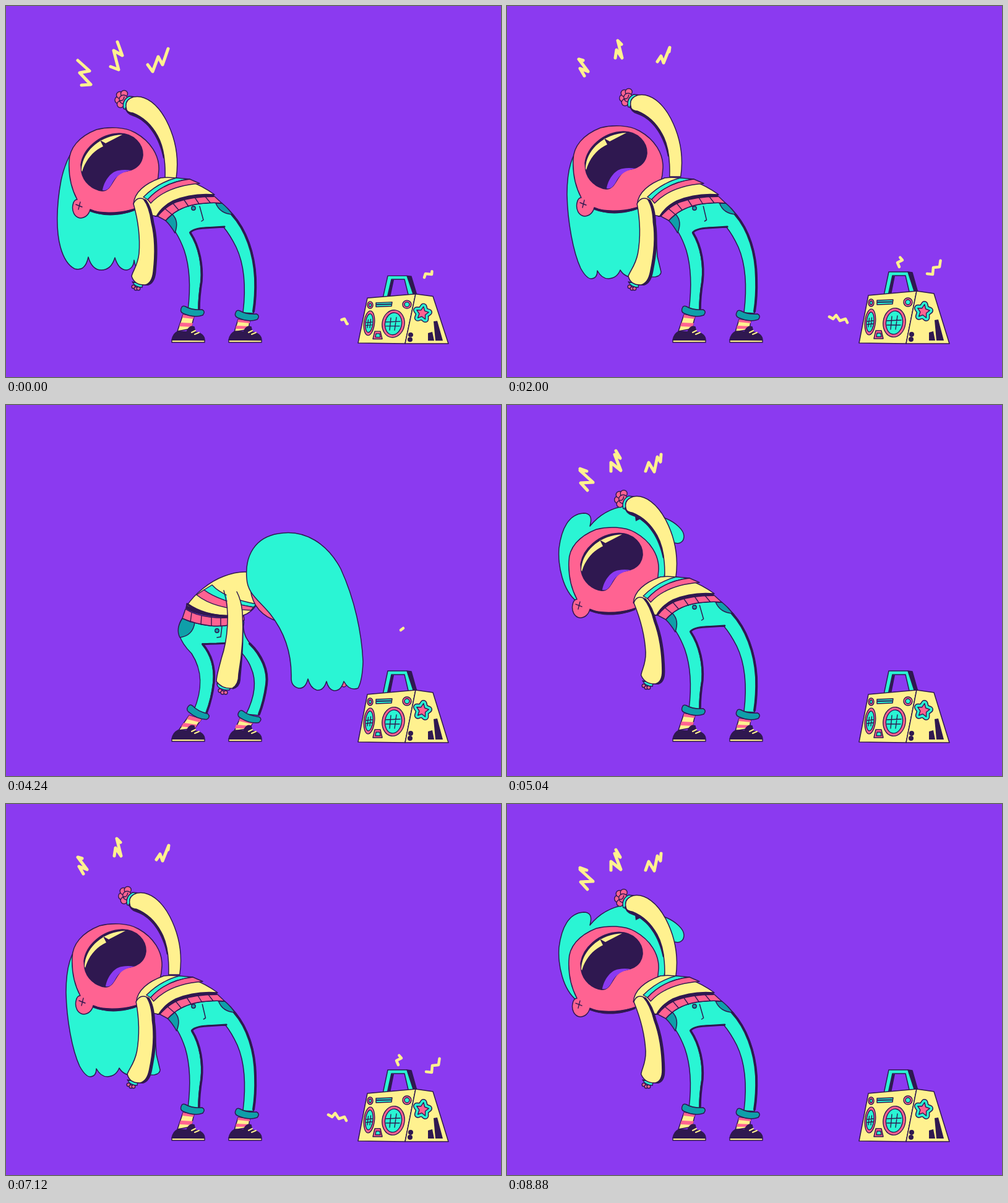
These frames come from a looping animation (800x600 px, 8.96 s). An HTML page:

```html
<!DOCTYPE html>
<html lang="en">
<head>
<meta charset="utf-8">
<title>Headbanger</title>
<style>
html, body { margin: 0; width: 100%; height: 100%; overflow: hidden; background: #8b3af0; }
svg { display: block; width: 100%; height: 100%; }
</style>
</head>
<body>
<svg id="stage" viewBox="0 0 800 600" stroke-linejoin="round" stroke-linecap="round"></svg>
<script>
const BG = '#8b3af0', INK = '#2f1850', TEAL = '#2af5d4', DEEP = '#0f9fa9', PINK = '#ff6392', CREAM = '#fff18f';
const STEP = 80, STEPS = 8;
const stage = document.getElementById('stage');

const shape = (d, fill, w = 1.5) => `<path d="${d}" fill="${fill}" stroke="${INK}" stroke-width="${w}"/>`;
const flat = (d, fill) => `<path d="${d}" fill="${fill}"/>`;
const line = (d, w = 1.5, color = INK) => `<path d="${d}" fill="none" stroke="${color}" stroke-width="${w}"/>`;
const oval = (x, y, rx, fill, ry = rx) =>
  `<ellipse cx="${x}" cy="${y}" rx="${rx}" ry="${ry}" fill="${fill}" stroke="${INK}" stroke-width="1.4"/>`;
const group = (t, s) => `<g transform="${t}">${s}</g>`;
const clamp = v => Math.max(0, Math.min(1, v));
const lerp = (a, b, u) => a + (b - a) * u;

// Move every coordinate pair of an absolute path
const warp = (d, f) => d.replace(/(-?[\d.]+) (-?[\d.]+)/g, (m, x, y) => f(+x, +y).map(v => v.toFixed(1)).join(' '));
const mix = (a, b, u) => {
  const n = b.match(/-?[\d.]+/g);
  let i = 0;
  return a.replace(/-?[\d.]+/g, v => lerp(+v, +n[i++], u).toFixed(1));
};
const leaner = s => d => warp(d, (x, y) => [x + s * clamp((440 - y) / 135), y]);

// Each entry: leaning back, leaning forward
const LEGS = {
  pants: ['M258 347Q275 327 305 321Q330 317 349 319C378 343 395 378 401 415C406 445 403 470 400 497L383 496C388 455 386 420 372 390Q362 370 352 358Q308 356 297 366C312 390 317 420 315 445Q311 470 311 492L294 492C298 460 298 425 288 395Q276 362 258 347Z',
    'M285 345Q305 354 330 357Q360 360 384 348C381 378 395 383 408 405C428 435 424 460 409 502L388 500C403 470 405 445 396 425Q390 408 366 385Q340 386 317 386C332 405 337 425 335 448Q332 475 323 500L303 495C318 460 318 430 300 402Q268 370 285 345Z'],
  outer: ['M365 337C388 362 401 400 403 440Q404 470 400 494', 'M394 386C414 405 424 430 421 452Q417 480 409 500'],
  inner: ['M298 367C313 390 318 420 316 445Q312 470 312 490', 'M318 387C333 405 338 425 336 448Q333 475 324 498'],
  crotch: ['M298 366Q303 360 322 359L353 357', 'M318 387Q330 386 340 386L360 385'],
  pocketL: ['M258 347Q264 341 269 337Q280 348 273 367Q266 355 258 347Z', 'M285 345Q295 350 305 352Q302 373 281 376Q274 362 285 345Z'],
  pocketR: ['M339 319Q346 336 366 337Q358 326 349 319Z', 'M379 352Q380 356 384 356Q385 352 384 348Z'],
  fly: ['M313 324L319 346L316 348', 'M349 358L347 375L341 376'],
  band: ['M245 340Q265 315 300 308Q320 306 337 308L349 319Q330 317 305 321Q275 327 258 347Z',
    'M290 330Q305 340 330 343Q360 347 384 339L385 348Q360 360 330 357Q305 354 285 345Z'],
  ticks: ['M256 327L268 337M268 317L279 330M286 311L295 324M304 308L312 320M321 307L330 318',
    'M300 336L298 351M316 341L315 355M332 343L332 357M347 344L347 358M366 344L367 356'],
  sockL: ['M286 499L304 502L299 522L277 526Z', 'M296 502L316 508L305 523L279 526Z'],
  sockR: ['M375 507L394 509L392 523L369 527Z', 'M378 507L400 512L394 523L369 527Z'],
  stripeL: ['M286 499L304 502L303 506L285 504ZM282 512L302 513L300 519L280 518Z', 'M296 502L316 508L313 513L292 508ZM287 514L309 517L306 522L283 520Z'],
  stripeR: ['M375 507L394 509L394 513L374 511ZM372 517L393 518L393 522L371 522Z', 'M378 507L400 512L398 516L376 511ZM372 517L395 519L393 523L370 523Z']
};

const SHOE = shape('M268 540Q270 530 278 526L292 527Q296 516 304 519L306 527Q321 530 321 541Z', INK) +
  shape('M268 540L321 540.500L321 544L268 544Z', CREAM, 1.4) + line('M300 528L306 525M305 531L312 528', 2, CREAM);
const CUFF = shape('M284 487Q280 494 286 497Q304 505 318 500Q323 494 317 491Q300 492 290 486Q286 484 284 487Z', DEEP);

function legs(u, lean) {
  const part = k => lean(mix(...LEGS[k], u));
  return shape(part('sockL'), CREAM) + flat(part('stripeL'), PINK) + shape(part('sockR'), CREAM) + flat(part('stripeR'), PINK) +
    SHOE + group('translate(92 0)', SHOE) +
    shape(part('pants'), TEAL) + line(part('outer'), 4) + line(part('inner'), 3.6) + line(part('crotch'), 3) +
    shape(part('pocketL'), DEEP) + shape(part('pocketR'), DEEP) + line(part('fly')) +
    oval(lerp(303, 341, u), lerp(327, 365, u), 3.2, DEEP) +
    group(`translate(${9 * u} ${4 * u}) rotate(${17 * u} 302 494)`, CUFF) +
    group(`translate(${88 + 4 * u} ${7 + 4 * u}) rotate(${9 * u} 302 494)`, CUFF) +
    shape(part('band'), PINK) + line(part('ticks'), 1.4);
}

const HEAD = flat('M136 331C152 340 185 340 209 324L209 330C185 341 152 341 136 331Z', INK) +
  shape('M146 200C165 195 192 195 209 205C234 219 248 242 247 265C246 298 228 322 205 329C180 336 150 336 136 329C134 338 127 343 120 343C111 342 106 332 108 322C109 316 112 313 115 313C106 296 101 275 102 252C102 230 118 211 146 200Z', PINK) +
  line('M137 331C155 338 185 338 208 329', 3.5) + line('M113 321L123 325M120 317L117 329', 1.4) +
  shape('M121 257C124 232 150 207 183 206C207 206 222 224 221 242C219 260 205 266 190 268C172 273 172 300 155 299C140 297 125 285 122 268Z', INK) +
  flat('M122 266C122 240 147 210 188 208L161 222L152 217L157 227C140 235 128 250 123 268Z', CREAM) +
  flat('M156 298C158 285 168 268 182 266Q192 264 203 266C188 268 179 274 173 284C167 295 164 299 156 298Z', BG);

const FIST = oval(182, 152, 6, PINK) + oval(184, 144, 5.5, PINK) + oval(191, 142, 5.5, PINK) +
  oval(185, 159, 5.5, PINK) + oval(190, 151, 7, PINK) + line('M184 153Q190 154 191 147');
const RAISED = FIST + shape('M190 166Q187 152 199 146L209 147Q195 153 195 168Z', TEAL) +
  flat('M192 164Q194 175 205 178C230 186 248 215 254 246L258 248L240 190L205 166Z', INK) +
  shape('M195 168Q190 152 206 147C226 143 246 160 259 185C273 212 280 245 275 279L257 279C258 250 255 228 245 210C234 190 220 179 205 173Q197 172 195 168Z', CREAM);

const SLEEVE = 'M206 320C213 345 217 375 215 400C213 420 205 428 203 437Q208 452 225 451Q236 448 238 430C242 395 240 370 235 350Q232 325 222 312Q211 308 206 320Z';
const HAND = oval(206, 454, 2.8, PINK) + oval(210, 457, 2.8, PINK) + oval(214, 457, 2.8, PINK) +
  shape('M204 446Q209 455 220 455L221 450Z', TEAL, 1.4);

const BACK_HAIR = {
  up: 'M113 318C90 300 82 260 84 232C88 200 100 176 124 175Q140 175 134 196C150 176 172 166 192 163L225 172L258 184C272 190 286 202 286 212C286 223 277 226 268 222C262 245 256 262 254 278L240 300L200 320Z',
  fall: 'M150 205C118 210 98 240 89 282C81 325 81 365 88 390C93 408 101 420 111 425Q128 430 133 406Q139 427 154 427Q170 427 176 407Q182 427 195 427Q206 425 207 411Q209 424 214 426L222 330L235 280Z',
  rest: 'M120 225C103 240 97 270 97 305C98 350 107 398 119 424Q129 442 137 441Q146 440 146 428Q153 441 164 441Q178 440 183 427Q190 439 206 439L240 438Q249 436 249 430L243 405L236 280Z'
};
const FRONT_HAIR = 'M389 280C386 243 403 214 440 208C483 200 520 225 541 265C564 315 575 370 577 415Q576 445 569 458Q555 463 546 447Q541 463 530 462Q521 460 518 447Q513 463 502 461Q492 458 488 443Q484 459 473 458Q461 455 461 442C462 400 450 367 427 338C408 315 390 305 389 280Z';

function backPose(s, hair, k) {
  const lean = leaner(s);
  const sleeve = warp(SLEEVE, (x, y) => [x + s + k * clamp((y - 312) / 135), y]);
  return shape(BACK_HAIR[hair], TEAL) +
    (hair === 'up' ? flat('M207 180L208 188L216 184Z', INK) : '') +
    group(`translate(${s} ${-.6 * s})`, HEAD) + group(`translate(${s * 1.15} ${-.6 * s})`, RAISED) + legs(0, lean) +
    flat(lean('M337 304Q300 301 268 314Q250 325 240 341L245 341Q258 325 275 318Q300 309 336 309Z'), INK) +
    shape(lean('M206 320C208 300 225 287 250 278Q292 273 337 305Q300 302 270 315Q252 324 243 340L232 338Z'), CREAM) +
    shape(lean('M222 309Q245 286 275 278L297 280Q254 285 229 313Z'), TEAL, 1.4) +
    shape(lean('M229 313Q254 285 297 280L313 287Q260 291 234 319Z'), PINK, 1.4) +
    group(`translate(${s + k} 0)`, HAND) + group('translate(4.500 1)', flat(sleeve, INK)) + shape(sleeve, CREAM);
}

const FRONT_ARM = oval(346, 462, 3, PINK) + oval(350, 465, 3, PINK) + oval(355, 465, 3, PINK) +
  shape('M341 450Q341 461 361 461L363 457Z', TEAL, 1.4) +
  flat('M383 350C385 390 381 420 379 445Q378 457 366 460L370 430Z', INK) +
  flat('M355 297C362 340 358 380 348 410C343 430 340 438 340 447Q350 460 366 458Q376 452 376 435C382 400 384 365 382 335Q380 315 372 300Z', CREAM) +
  line('M352 300C363 335 358 380 348 410C343 430 340 438 340 447Q350 460 366 458Q376 452 376 435C382 400 384 365 382 335Q380 315 373 302');

function frontPose(s, hair) {
  const lean = leaner(s);
  return legs(1, lean) +
    flat(lean('M292 320Q320 340 384 340L383 344Q315 346 290 329Z'), INK) +
    shape(lean('M292 325C305 305 330 285 352 277Q372 269 389 270L395 300L405 323Q396 336 384 340Q330 344 292 325Z'), CREAM) +
    shape(lean('M320 299L333 291Q352 312 405 322L400 327Q345 318 320 299Z'), TEAL, 1.4) +
    shape(lean('M308 307L320 299Q345 318 400 327L396 332Q336 330 308 307Z'), PINK, 1.4) +
    line(lean('M293 322Q320 341 360 342'), 3.5) + group(`translate(${s} 0)`, FRONT_ARM) + hair;
}

const FACE_EDGE = shape('M395 298C398 325 415 343 440 350L425 320Z', PINK);
const hangHair = FACE_EDGE + oval(546, 452, 4, PINK) + shape(FRONT_HAIR, TEAL);
const swungHair = FACE_EDGE +
  shape(warp(FRONT_HAIR, (x, y) => [x + 4 + 15 * clamp((y - 220) / 230), y - 14 * clamp((y - 260) / 190)]), TEAL);
const flungHair = shape('M395 290C398 330 430 354 468 352C510 349 538 320 539 280L500 230L420 230Z', PINK) +
  shape('M393 300C380 262 372 215 387 193C395 178 412 180 414 194C422 170 444 166 456 182C472 168 498 172 506 190C540 205 556 250 546 300Q520 322 480 320Q425 322 393 300Z', TEAL);

const UPRIGHT = flat('M266 333Q310 342 363 324L364 330Q310 346 266 338Z', INK) +
  shape('M266 333C262 300 270 262 292 250Q320 242 340 254C358 270 364 300 363 325Q310 342 266 333Z', CREAM) +
  shape('M268 285Q310 296 354 281L358 292Q312 308 265 298Z', TEAL, 1.4) +
  shape('M265 298Q312 308 358 292L361 304Q312 320 265 312Z', PINK, 1.4);

function risingPose(toFront) {
  const far = group('translate(100 -22)', shape(SLEEVE, CREAM));
  const near = group('translate(80 -38)', HAND + group('translate(5 1)', flat(SLEEVE, INK)) + shape(SLEEVE, CREAM));
  const body = legs(toFront ? .4 : .6, d => d) + UPRIGHT + near;
  return toFront
    ? group('translate(122 -92) rotate(32 175 265)', shape(BACK_HAIR.rest, TEAL)) + far + body +
      group('translate(122 -92) rotate(48 175 265)', HEAD)
    : far + body + group('translate(-92 -66) rotate(-12 460 280)', FACE_EDGE + shape(FRONT_HAIR, TEAL));
}

function star(x, y, r) {
  let d = '';
  for (let i = 0; i < 10; i++) {
    const a = i * Math.PI / 5 - 1.4, q = i % 2 ? r * .5 : r;
    d += `${i ? 'L' : 'M'}${(x + q * .9 * Math.cos(a)).toFixed(1)} ${(y + q * Math.sin(a)).toFixed(1)}`;
  }
  d += 'Z';
  return line(d, 11.5) + line(d, 8.5, TEAL) + shape(d, PINK, 1.4);
}

const BOOMBOX = shape('M648 430L655 431L664 463L656 466Z', INK) +
  flat('M617 467L623 437L627 437L621 467Z', INK) +
  shape('M609 468L617 430L648 430L659 464L651 466L644 436L623 436L616 468Z', TEAL) +
  shape('M584 468L662 461L645 546L569 545Z', CREAM) + shape('M662 461L690 465L715 546L645 546Z', CREAM) +
  oval(588.500, 480, 4.500, PINK, 6) + oval(588.500, 480, 2, TEAL, 3) +
  oval(648, 479, 7, PINK) + oval(648, 479, 4, TEAL) +
  shape('M598 476L624 475L623 482L598 483Z', TEAL, 1.5) + line('M599 479L622 478.500', 2) +
  group('rotate(6 587 511)', oval(587, 511, 8.500, PINK, 21) + oval(587, 511, 6, TEAL, 16)) +
  line('M585.500 505L584 519M589.500 504L588 519M582 510L592 509M582 515L592 514', 1.3) +
  group('rotate(8 626 512)', oval(626, 512, 18, PINK, 23.500) + oval(626, 512, 13.500, TEAL, 19)) +
  line('M622 502L620 523M631 501L628 523M614 509L637 508M614 516L636 516', 1.4) +
  shape('M596 525L605 525L608 538L593 538Z', PINK) + shape('M598 529L604 529L605 535L597 535Z', TEAL, 1.4) +
  oval(654, 531, 3.3, INK) + oval(653, 539, 3.3, INK) + star(673, 494, 11.5) +
  flat('M682 528L689 526L692 541L682 541ZM691 508L697 507L706 541L694 541Z', INK);

// Zigzags shooting off the speaker: path, then [start, end] percent per step
const SPARKS = [
  ['M676 439L678 433L688 434L689 423L699 422L701 409L711 407L712 395L720 393', [[0, 26], [9, 59], [35, 83], [60, 97], [88, 100]]],
  ['M559 514L551 514L547 506L538 509L532 500L527 506L520 502L514 507L505 500', [[10, 30], [14, 72], [45, 90], [66, 98], [90, 100]]],
  ['M634 422L631 415L639 411L634 405L642 399L636 392L643 386L637 379L643 373L638 364L642 361', [null, [0, 26], [10, 55], [35, 78], [60, 92], [94, 100]]]
];
const sparks = n => SPARKS.map(([d, trims]) => {
  if (!trims[n]) return '';
  const [from, to] = trims[n];
  return `<path d="${d}" pathLength="100" fill="none" stroke="${CREAM}" stroke-width="4.5" stroke-dasharray="${to - from} 300" stroke-dashoffset="${-from}"/>`;
}).join('');

// Three bolts over the fist, per step
const BOLTS = {
  7: 'M130 138L119 126L139 125L118 106L129 107L118 103M168 107L168 93L184 106L174 80L183 86L176 74M224 107L229 93L238 108L243 84L248 92L249 80',
  0: 'M116 88L135 105L119 108L137 127L122 128M180 58L188 80L174 72L182 103L169 98M262 69L253 95L246 82L237 106L229 95',
  1: 'M125 113L118 101L131 106L116 86L123 88M175 84L177 71L186 84L179 56L185 62M243 90L249 81L253 92L263 67L262 74',
  2: 'M112 84L114 86M181 52L182 55M266 66L265 69'
};

const POSES = [
  () => backPose(0, 'fall', 0),
  () => backPose(5, 'rest', -13),
  () => risingPose(true),
  () => frontPose(4, flungHair),
  () => frontPose(4, swungHair),
  () => frontPose(0, hangHair),
  () => risingPose(false),
  () => backPose(-2, 'up', 17)
];

function draw(n) {
  const squash = n % 4 ? 1 : .945;
  stage.innerHTML = `<rect width="800" height="600" fill="${BG}"/>` +
    group(`translate(0 ${546 * (1 - squash)}) scale(1 ${squash})`, BOOMBOX) + sparks(n) +
    POSES[n]() + (BOLTS[n] ? line(BOLTS[n], 5, CREAM) : '');
}

let shown = -1;
const start = performance.now();
function tick() {
  const n = Math.floor((performance.now() - start) / STEP) % STEPS;
  if (n !== shown) draw(shown = n);
  requestAnimationFrame(tick);
}
tick();
</script>
</body>
</html>
```
